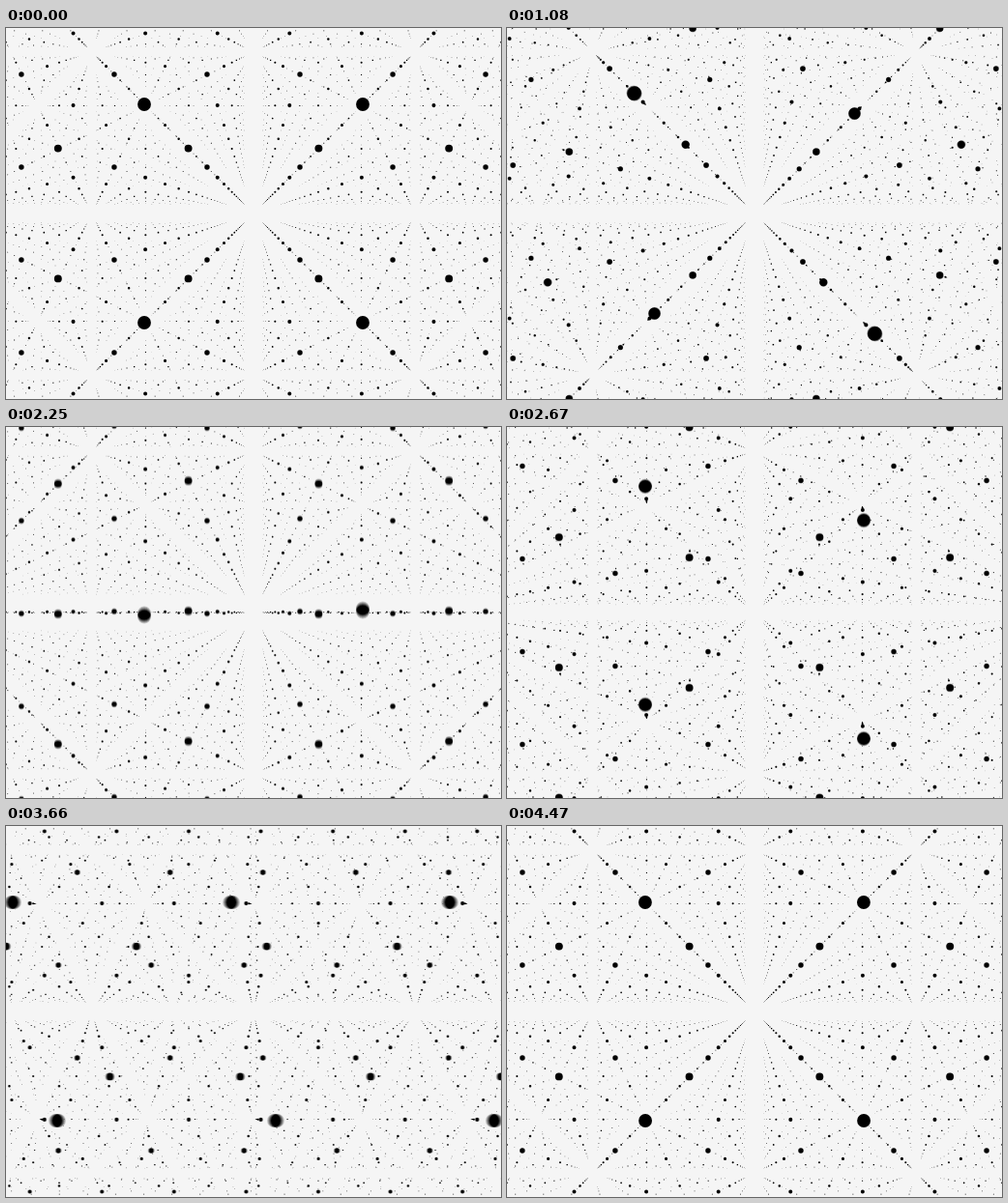
These frames come from a looping animation (512 by 384 pixels, 4500 ms). An HTML page with a canvas:

```html
<!DOCTYPE html>
<html>
<head>
<meta charset="utf-8">
<title>Sliding lattice</title>
<style>
  html, body { margin: 0; width: 100%; height: 100%; overflow: hidden; background: #f5f5f5; }
  canvas { display: block; }
</style>
</head>
<body>
<canvas id="stage" width="512" height="384"></canvas>
<script>
const ctx = document.getElementById('stage').getContext('2d');
const W = 512, H = 384, CX = W / 2, CY = H / 2;
const STEP = 30, STEPS = 150, PHASE = 50;   // 30 ms ticks, three phases per loop
const FOCAL = 167, NEAR = 0.478, LAYERS = 18;
const DOT = 0.065, FADE = 26;               // dot size against half the spacing, shrinking with depth
const SAMPLES = 5, SHUTTER = 0.6;           // motion blur
const PAPER = 245;

const ease = (t, g = 1.9) => t ** g / (t ** g + (1 - t) ** g);
const sign = n => (n & 1 ? -1 : 1);

function addDot(path, x, y, r) {
  if (x < -r || x > W + r || y < -r || y > H + r) return;
  if (r < 0.85) {
    const s = r * Math.sqrt(Math.PI);       // square of equal area
    path.rect(x - s / 2, y - s / 2, s, s);
  } else {
    path.moveTo(x + r, y);
    path.arc(x, y, r, 0, 2 * Math.PI);
  }
}

// Alternate rows of the lattice slide one cell in opposite directions: along z, then y, then x.
function lattice(tick) {
  const path = new Path2D();
  const axis = Math.floor(tick / PHASE);
  const shift = ease(tick / PHASE - axis);
  const alongZ = axis === 0, alongY = axis === 1, alongX = axis === 2;
  const first = alongZ ? -1 : 0, last = alongZ ? LAYERS : LAYERS - 1;

  for (let k = first; k <= last; k++) {
    const cells = (k + NEAR + 1) / (2 * FOCAL);
    const cols = Math.ceil(CX * cells) + 2, rows = Math.ceil(CY * cells) + 2;
    for (let m = -cols; m < cols; m++) {
      const dy = alongY ? sign(m + k) * shift : 0;
      for (let n = -rows; n < rows; n++) {
        const dx = alongX ? sign(n + k) * shift : 0;
        const depth = k + NEAR + (alongZ ? sign(m + n) * shift : 0);
        if (depth < 0.2 || depth > LAYERS - 0.1) continue;
        const half = FOCAL / depth;
        const r = half * DOT * (1 - depth / FADE);
        addDot(path, CX + half * (2 * (m + dx) + 1), CY + half * (2 * (n + dy) + 1), r);
      }
    }
  }
  return path;
}

function fill(mode, level) {
  ctx.globalCompositeOperation = mode;
  ctx.fillStyle = `rgb(${level},${level},${level})`;
}

// Blur samples add up as light on black, then the sum is subtracted from the paper tone.
function draw(tick) {
  fill('source-over', 0);
  ctx.fillRect(0, 0, W, H);
  fill('lighter', PAPER / SAMPLES);
  for (let s = 0; s < SAMPLES; s++) {
    ctx.fill(lattice(tick + SHUTTER * (s + 0.5) / SAMPLES));
  }
  fill('difference', PAPER);
  ctx.fillRect(0, 0, W, H);
}

let shown = -1;
function run() {
  const tick = Math.floor(performance.now() / STEP) % STEPS;
  if (tick !== shown) draw(shown = tick);
  requestAnimationFrame(run);
}
run();
</script>
</body>
</html>
```
